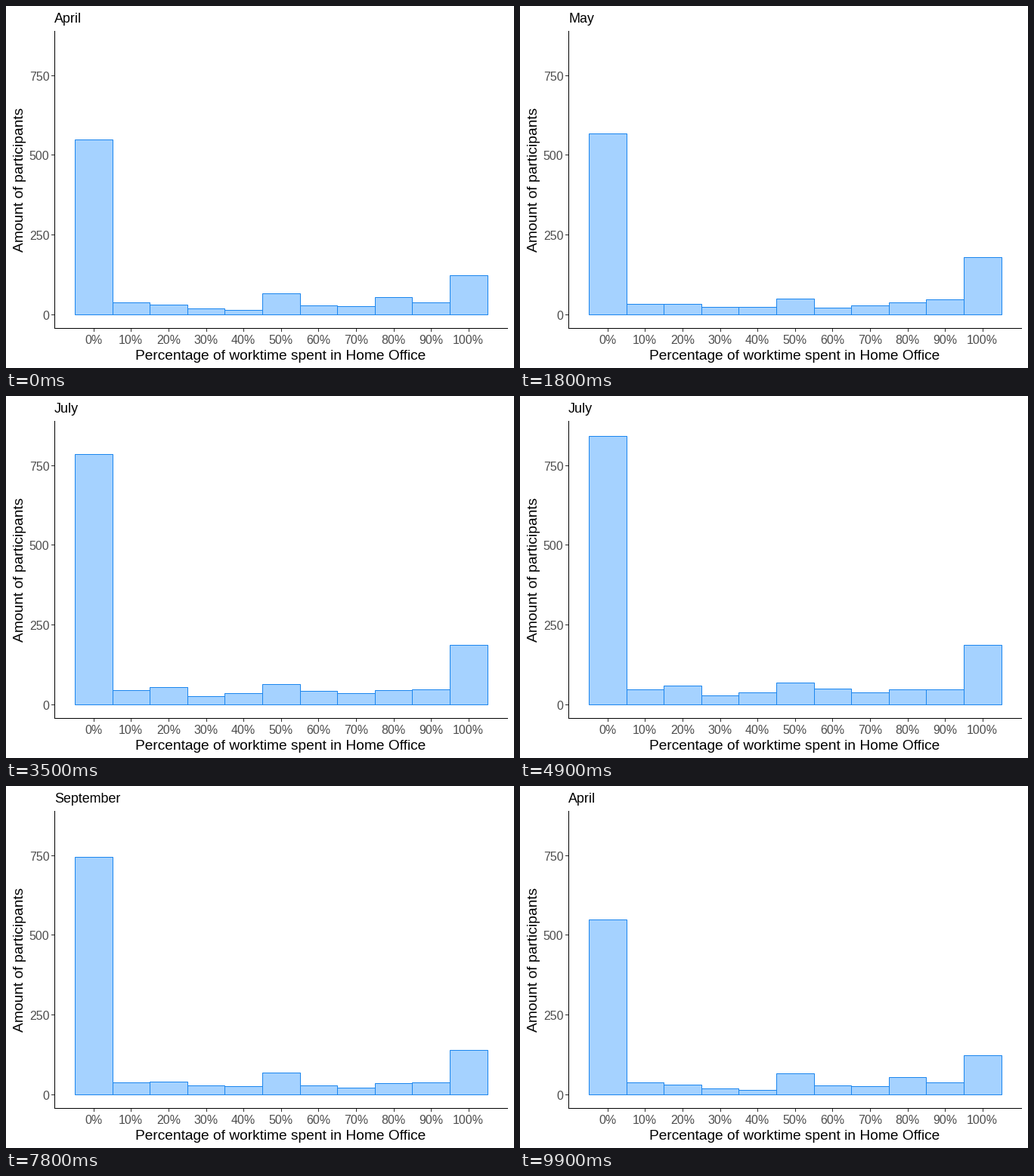
Animation of 672x480 px, one loop 10000 ms. Source, as a matplotlib script:

```python
import matplotlib.pyplot as plt
import numpy as np
from matplotlib.animation import FuncAnimation
from matplotlib.patches import Rectangle

W, H, DPI = 672, 480, 96
PX = 72 / DPI                     # one pixel in points
BASE, SCALE = 409, 0.4233         # zero row and pixels per participant
LEFT, STEP = 91.4, 49.6           # first bar edge and bar width
HOLD, MOVE, PERIOD = 7, 12, 20    # frames per month

MONTHS = ["April", "May", "July", "August", "September"]
COUNTS = np.array([
    [548, 38, 31, 19, 14, 66, 28, 26, 54, 38, 123],
    [567, 33, 33, 24, 24, 50, 21, 28, 38, 47, 180],
    [846, 47, 59, 28, 40, 69, 50, 38, 47, 47, 189],
    [749, 50, 45, 28, 21, 64, 31, 28, 40, 40, 151],
    [744, 38, 40, 28, 26, 69, 28, 21, 35, 38, 139],
])

plt.rcParams["font.family"] = ["Liberation Sans"]
fig = plt.figure(figsize=(W / DPI, H / DPI), dpi=DPI, facecolor="white")
ax = fig.add_axes([0, 0, 1, 1])
ax.set_xlim(0, W)
ax.set_ylim(H, 0)
ax.axis("off")


def line(x0, y0, x1, y1, color="black"):
    ax.plot([x0, x1], [y0, y1], color=color, lw=PX, snap=False,
            solid_capstyle="butt")


def label(x, y, text, size, color="black", ha="center", rotation=0):
    return ax.text(x, y, text, fontsize=size * PX, color=color, ha=ha,
                   va="baseline", rotation=rotation, rotation_mode="anchor")


def ease(t):
    return 2 * t * t if t < 0.5 else 1 - 2 * (1 - t) ** 2


edges = np.floor(LEFT + STEP * np.arange(12)) + 0.5
bars = []
for x0, x1 in zip(edges[:-1], edges[1:]):
    bar = Rectangle((x0, BASE + 0.5), x1 - x0, 0, facecolor="#A5D2FF",
                    edgecolor="#1C86EE", lw=PX, snap=False, zorder=1)
    bars.append(ax.add_patch(bar))

line(64.5, 33, 64.5, 428)
line(64, 427.5, 664, 427.5)
for value in range(0, 751, 250):
    y = round(BASE - SCALE * value) + 0.5
    line(60, y, 64, y, "#333333")
    label(57.3, y + 6.5, str(value), 16, "#4D4D4D", "right")
for i in range(11):
    x = LEFT + STEP * (i + 0.5)
    tick = np.floor(x) + 0.5
    line(tick, 428, tick, 432, "#333333")
    label(x - 0.5, 448, f"{10 * i}%", 16, "#4D4D4D")

label(363.5, 469, "Percentage of worktime spent in Home Office", 19.1)
label(23, 230, "Amount of participants", 19.3, rotation=90)
title = label(64, 22, MONTHS[0], 17.9, ha="left")


def draw(frame):
    month, step = divmod(frame, PERIOD)
    following = (month + 1) % len(MONTHS)
    t = min(max((step - HOLD) / MOVE, 0), 1)
    counts = COUNTS[month] + (COUNTS[following] - COUNTS[month]) * ease(t)
    for bar, n in zip(bars, counts):
        bar.set_height(-round(SCALE * n))
    title.set_text(MONTHS[following if t >= 0.5 else month])
    return [*bars, title]


anim = FuncAnimation(fig, draw, frames=PERIOD * len(MONTHS), interval=100,
                     repeat=True, repeat_delay=0, blit=False)
plt.show()
```
